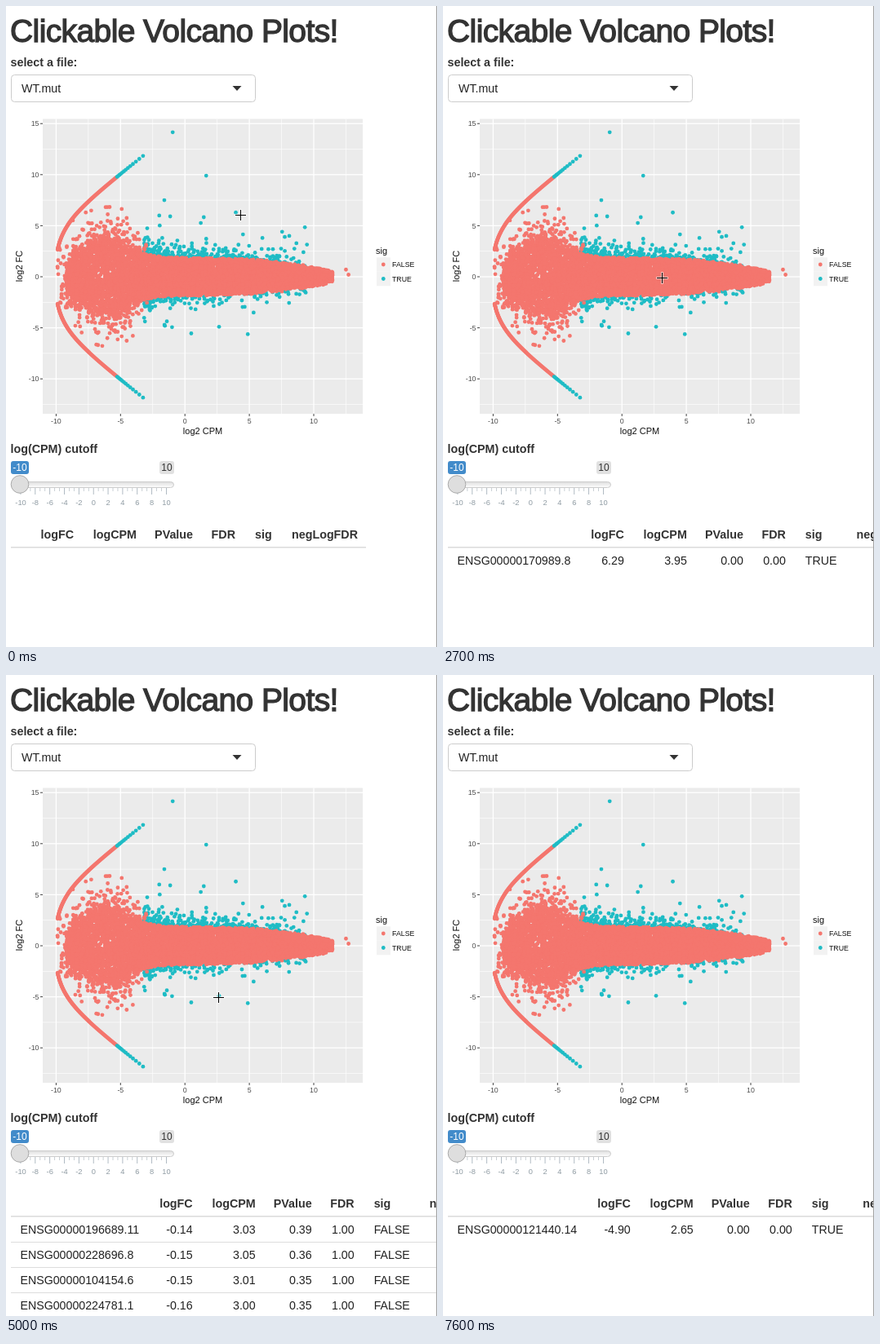
Write an HTML page with a canvas that moves like this. It is 528x786 px and loops after 7.7 s.

```html
<!DOCTYPE html>
<html lang="en">
<head>
<meta charset="utf-8">
<title>Clickable Volcano Plots</title>
<style>
html, body { margin: 0; width: 100%; height: 100%; overflow: hidden; background: #fff; }
canvas, svg { position: absolute; left: 0; top: 0; display: block; }
svg { font-family: "Liberation Sans", Arial, sans-serif; fill: #333; }
.h1 { font-size: 39px; letter-spacing: -.6px; stroke: #333; stroke-width: 1.3px; }
.b { font-size: 14.3px; font-weight: bold; }
.t { font-size: 14.2px; fill: #222; }
.axis { font-size: 11px; fill: #111; }
.tick { font-size: 8.8px; fill: #4d4d4d; }
.badge { font-size: 12px; }
.grid { font-size: 9.3px; fill: #8f9ba3; }
.mid { text-anchor: middle; }
.end { text-anchor: end; }
</style>
</head>
<body>
<canvas id="plot" width="528" height="786"></canvas>
<svg width="528" height="786" viewBox="0 0 528 786">
  <defs>
    <linearGradient id="track" x2="0" y2="1"><stop stop-color="#ddd"/><stop offset="1" stop-color="#fff"/></linearGradient>
    <clipPath id="page"><rect width="527" height="786"/></clipPath>
  </defs>
  <g id="fixed"></g>
  <g id="table" clip-path="url(#page)"></g>
  <path d="M527.5 0V786" stroke="#a3a3a3"/>
  <g id="cursor" fill="none">
    <path d="M-7 .5H8M.5 -7V8" stroke="#fff" stroke-opacity=".55" stroke-width="3"/>
    <path d="M-6 .5H7M.5 -6V7" stroke="#000"/>
  </g>
</svg>
<script>
const RED = '#f4766e', BLUE = '#1fbcc5', LOOP = 7700, CURSOR_HIDES = 6900;
const $ = id => document.getElementById(id);
const ctx = $('plot').getContext('2d');
const MID = 332;
const px = v => 219.2 + v * 15.78;   // log2 CPM to pixels
const py = v => MID - v * 12.52;     // log2 FC to pixels

let seed = 41;
function rnd() {
  seed = seed + 0x6D2B79F5 | 0;
  let t = Math.imul(seed ^ seed >>> 15, 1 | seed);
  t = t + Math.imul(t ^ t >>> 7, 61 | t) ^ t;
  return ((t ^ t >>> 14) >>> 0) / 4294967296;
}
const spread = () => rnd() * 2 - 1;
const bell = () => spread() + spread() + spread();
const expo = mean => -Math.log(1 - rnd()) * mean;
const times = (n, fn) => { for (let i = 0; i < n; i++) fn(i); };

function dot(x, y, color) {
  ctx.fillStyle = color;
  ctx.beginPath();
  ctx.arc(x, y, 2.4, 0, 7);
  ctx.fill();
}

function drawPanel() {
  ctx.fillStyle = '#ebebeb';
  ctx.fillRect(45, 138.5, 392, 361.5);
  ctx.fillStyle = '#fff';
  for (let v = -12.5; v <= 15; v += 2.5) {
    const w = v % 5 ? .6 : 1.3;
    if (v >= -10 && v <= 12.5) ctx.fillRect(px(v) - w / 2, 138.5, w, 361.5);
    ctx.fillRect(45, py(v) - w / 2, 392, w);
  }
  ctx.fillStyle = '#444';
  for (let v = -10; v <= 15; v += 5) {
    if (v < 15) ctx.fillRect(px(v) - .5, 500, 1, 3);
    ctx.fillRect(42, py(v) - .5, 3, 1);
  }
}

// Half height of the dense band: a hump on the left, a taper on the right
function band(x) {
  const hump = 23.5 + 17 * Math.exp(-(((x - 126) / 40) ** 2));
  const taper = 1 - Math.max(0, (x - 180) / 228) ** 3;
  return Math.max(0, Math.min(hump * taper, (x - 68) * 2));
}

// Genes seen in one sample only lie on a curve
function drawArc(side) {
  for (let fc = 2.65; fc < 12.1; fc += fc < 9.75 ? .06 : .08 + (fc - 9.75) * .12)
    dot(px(Math.log2(2 ** (fc - 15.1) + .00088)), py(side * fc), fc < 9.75 ? RED : BLUE);
}

function drawPoints() {
  times(410, i => {
    const side = i < 280 ? -1 : 1, x = 169 + 200 * rnd() ** 1.6;
    const gap = rnd() < .18 ? expo(17) : expo(5);
    dot(x, MID + side * (band(x) + Math.min(gap, 50)), BLUE);
  });
  times(7000, () => {
    const x = 74 + rnd() * 326, ragged = Math.max(0, (x - 260) / 140) * 5;
    dot(x, MID + spread() * band(x) + spread() * ragged, RED);
  });
  times(430, i => {
    const x = 124 + bell() * 25;
    if (x > 80 && x < 175) dot(x, MID + (i % 2 ? 1 : -1) * (band(x) + Math.min(expo(10), 45)), RED);
  });
  times(110, () => dot(88 - 25 * rnd() ** 1.5, MID + spread() * 38, RED));

  const outliers = [[-.95, 14.15], [1.65, 9.9], [-1.6, 7.5], [3.95, 6.29], [8.1, 4], [9.2, 2.4],
    [2.65, -4.9], [8, -1.5], [12.5, .7], [12.7, .2]];
  outliers.forEach(([cpm, fc]) => dot(px(cpm), py(fc), cpm > 12 ? RED : BLUE));
  drawArc(1);
  drawArc(-1);
}

const text = (x, y, cls, s, extra = '') => `<text x="${x}" y="${y}" class="${cls}" ${extra}>${s}</text>`;
const rect = (x, y, w, h, fill, extra = '') =>
  `<rect x="${x}" y="${y}" width="${w}" height="${h}" fill="${fill}" ${extra}/>`;

function drawFixed() {
  let s = text(5, 43.5, 'h1', 'Clickable Volcano Plots!') + text(5.5, 74, 'b', 'select a file:')
    + rect(6.5, 84.5, 299, 33, '#fff', 'rx="4" stroke="#ccc"') + text(19, 106, 't', 'WT.mut')
    + '<path d="M277.5 98H288.5L283 104Z"/>';

  for (let v = -10; v <= 15; v += 5) {
    if (v < 15) s += text(px(v), 512, 'tick mid', v);
    s += text(40.5, py(v) + 3.2, 'tick end', v);
  }
  s += text(241, 525, 'axis mid', 'log2 CPM')
    + text(0, 0, 'axis mid', 'log2 FC', 'transform="translate(19.5 319) rotate(-90)"')
    + text(453, 304, 'axis', 'sig');
  [['FALSE', RED], ['TRUE', BLUE]].forEach(([label, color], i) => {
    const y = 317 + i * 17.5;
    s += rect(454, y - 8.7, 17, 17.5, '#f2f2f2') + `<circle cx="462.3" cy="${y}" r="2.4" fill="${color}"/>`
      + text(473, y + 3.4, 'tick', label, 'style="fill:#111"');
  });

  s += text(5.5, 548, 'b', 'log(CPM) cutoff')
    + rect(6, 558, 22, 16, '#428bca', 'rx="3"') + text(17, 570.3, 'badge mid', '-10', 'fill="#fff"')
    + rect(188, 558, 18, 16, '#e1e1e1', 'rx="3"') + text(197, 570.3, 'badge mid', '10')
    + rect(6.5, 583.5, 199, 7, 'url(#track)', 'rx="4" stroke="#ccc"');
  times(31, i => {
    const x = 17.5 + i * 5.95, big = i % 3 === 0;
    s += rect(x, 591, .9, big ? 8 : 4, big ? '#a9b4bd' : '#c3cad0');
    if (big) s += text(x + .5, 612, 'grid mid', i / 3 * 2 - 10);
  });
  s += '<circle cx="17" cy="586.5" r="10.8" fill="#dedede" stroke="#aaa"/>';
  $('fixed').innerHTML = s;
}

const tables = [
  { from: 0, rows: [] },
  { from: 1000, rows: ['ENSG00000170989.8 6.29 3.95 0.00 0.00 TRUE'] },
  { from: 3000, rows: [
    'ENSG00000196689.11 -0.14 3.03 0.39 1.00 FALSE',
    'ENSG00000228696.8 -0.15 3.05 0.36 1.00 FALSE',
    'ENSG00000104154.6 -0.15 3.01 0.35 1.00 FALSE',
    'ENSG00000224781.1 -0.16 3.00 0.35 1.00 FALSE'] },
  { from: 5200, rows: ['ENSG00000121440.14 -4.90 2.65 0.00 0.00 TRUE'] }
];
const columns = [83, 160, 229, 281, 305, 350];   // four right edges, then left edges
const heads = ['logFC', 'logCPM', 'PValue', 'FDR', 'sig', 'negLogFDR'];

// The first and the "sig" column grow with their widest cell
function drawTable({ rows }) {
  const cells = rows.map(r => r.split(' '));
  ctx.font = '14.2px "Liberation Sans", Arial, sans-serif';
  const widest = (i, least) => Math.max(least, ...cells.map(c => ctx.measureText(c[i]).width));
  const shift = widest(0, 0), grow = widest(5, 21) - 21;
  const line = (values, y, cls) => values.map((v, i) =>
    text(columns[i] + shift + (i > 4 ? grow : 0), y, cls + (i < 4 ? ' end' : ''), v)).join('');
  const width = rows.length ? 521 : 435;

  let s = line(heads, 653, 'b') + rect(6, 663, width, 1.6, '#ddd');
  cells.forEach(([id, ...values], i) => {
    const y = 685 + i * 31;
    s += text(17.5, y, 't', id) + line(values, y, 't');
    if (i) s += rect(6, y - 21, width, 1, '#ddd');
  });
  $('table').innerHTML = s;
}

// Cursor stops: time, x, y
const stops = [[0, 287, 256], [500, 281, 253], [1100, 281, 253], [1600, 280, 272],
  [2700, 268, 333], [2900, 267, 333], [3400, 267, 355], [4200, 260, 395], [LOOP, 261, 395]];

function cursorAt(t) {
  const i = stops.findIndex(s => s[0] > t), a = stops[i - 1], b = stops[i];
  const k = (t - a[0]) / (b[0] - a[0]);
  return [1, 2].map(j => Math.round(a[j] + (b[j] - a[j]) * k));
}

let shown;
function frame(now) {
  const t = Math.floor(now % LOOP / 100) * 100;
  const table = tables.filter(v => v.from <= t).pop();
  if (table !== shown) drawTable(shown = table);
  $('cursor').setAttribute('transform', `translate(${cursorAt(t)})`);
  $('cursor').style.display = t < CURSOR_HIDES ? '' : 'none';
  requestAnimationFrame(frame);
}

drawPanel();
drawPoints();
drawFixed();
frame(performance.now());
</script>
</body>
</html>
```
